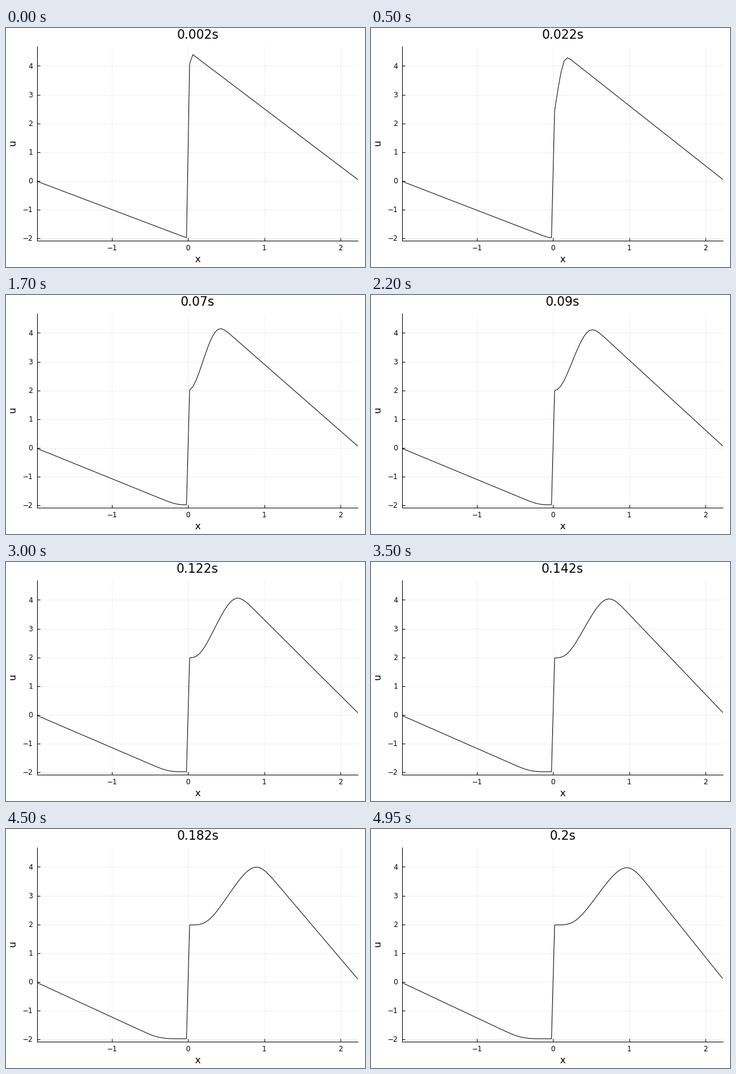
These frames come from a looping animation (600x400 px, 5000 ms). A matplotlib script:

```python
import numpy as np
import matplotlib.pyplot as plt
from matplotlib.animation import FuncAnimation

W, H, DPI = 600, 400, 100
PX = 72 / DPI  # points per pixel
LEFT, RIGHT, TOP, BOTTOM = 52.3, 588.1, 30.7, 355.7
FRAMES, FRAME_DT = 100, 0.002
CELLS, CFL = 102, 0.5

plt.rcParams["font.family"] = "DejaVu Sans"


def upwind_step(u, ratio):
    """One Roe step of Burgers' equation, without an entropy fix."""
    padded = np.concatenate([u[:1], u, u[-1:]])
    a, b = padded[:-1], padded[1:]
    flux = np.where(a + b > 0, a**2, b**2) / 2
    return u - ratio * np.diff(flux)


dx = 4.25 / CELLS
dt = CFL * dx / 4.5
x = -2 + dx * (np.arange(CELLS) + 0.5)
states = [np.where(x < 0, -2 - x, 4.5 - 2 * x)]
while (len(states) - 2) * dt < FRAMES * FRAME_DT:
    states.append(upwind_step(states[-1], dt / dx))


def solution(t):
    """Linear interpolation between the solver's steps."""
    k = int(t / dt)
    part = t / dt - k
    return (1 - part) * states[k] + part * states[k + 1]


fig = plt.figure(figsize=(W / DPI, H / DPI), dpi=DPI, facecolor="white")
ax = fig.add_axes([LEFT / W, 1 - BOTTOM / H,
                   (RIGHT - LEFT) / W, (BOTTOM - TOP) / H])
ax.set_xlim(x[0], x[-1])
ax.set_ylim(1.05 * states[0].min(), 1.05 * states[0].max())
ax.set_xticks([-1, 0, 1, 2])
ax.set_yticks(range(-2, 5))
ax.set_axisbelow(True)
ax.grid(color="black", alpha=0.1, linewidth=0.6 * PX)
ax.tick_params(direction="in", length=5 * PX, width=PX,
               labelbottom=False, labelleft=False)
ax.spines[["top", "right"]].set_visible(False)
ax.spines[["left", "bottom"]].set_linewidth(PX)


def put(px, py, text, size, ha="center", **kw):
    """Place text by its baseline, in pixels from the top left."""
    return fig.text(px / W, 1 - py / H, text, fontsize=size * PX,
                    ha=ha, va="baseline", **kw)


def tick_text(value):
    return str(value).replace("-", "\u2212")


def to_pixels(vx, vy):
    px, py = ax.transData.transform((vx, vy))
    return px, H - py


for v in (-1, 0, 1, 2):
    put(to_pixels(v, 0)[0], 371.5, tick_text(v), 11.7)
for v in range(-2, 5):
    put(45, to_pixels(0, v)[1] + 4.3, tick_text(v), 11.7, ha="right")

mid_x = (LEFT + RIGHT) / 2
put(mid_x, 392, "x", 16.1)
put(16, 192, "u", 16.1, rotation=90, rotation_mode="anchor")
title = put(mid_x, 17.8, "", 20.8)
line, = ax.plot(x, states[0], color="black", linewidth=PX)


def draw(i):
    t = FRAME_DT * (i + 1)
    line.set_ydata(solution(t))
    title.set_text(f"{t:.3g}s")
    return line, title


anim = FuncAnimation(fig, draw, frames=FRAMES, interval=50,
                     repeat=True, repeat_delay=0, blit=False)
plt.show()
```
